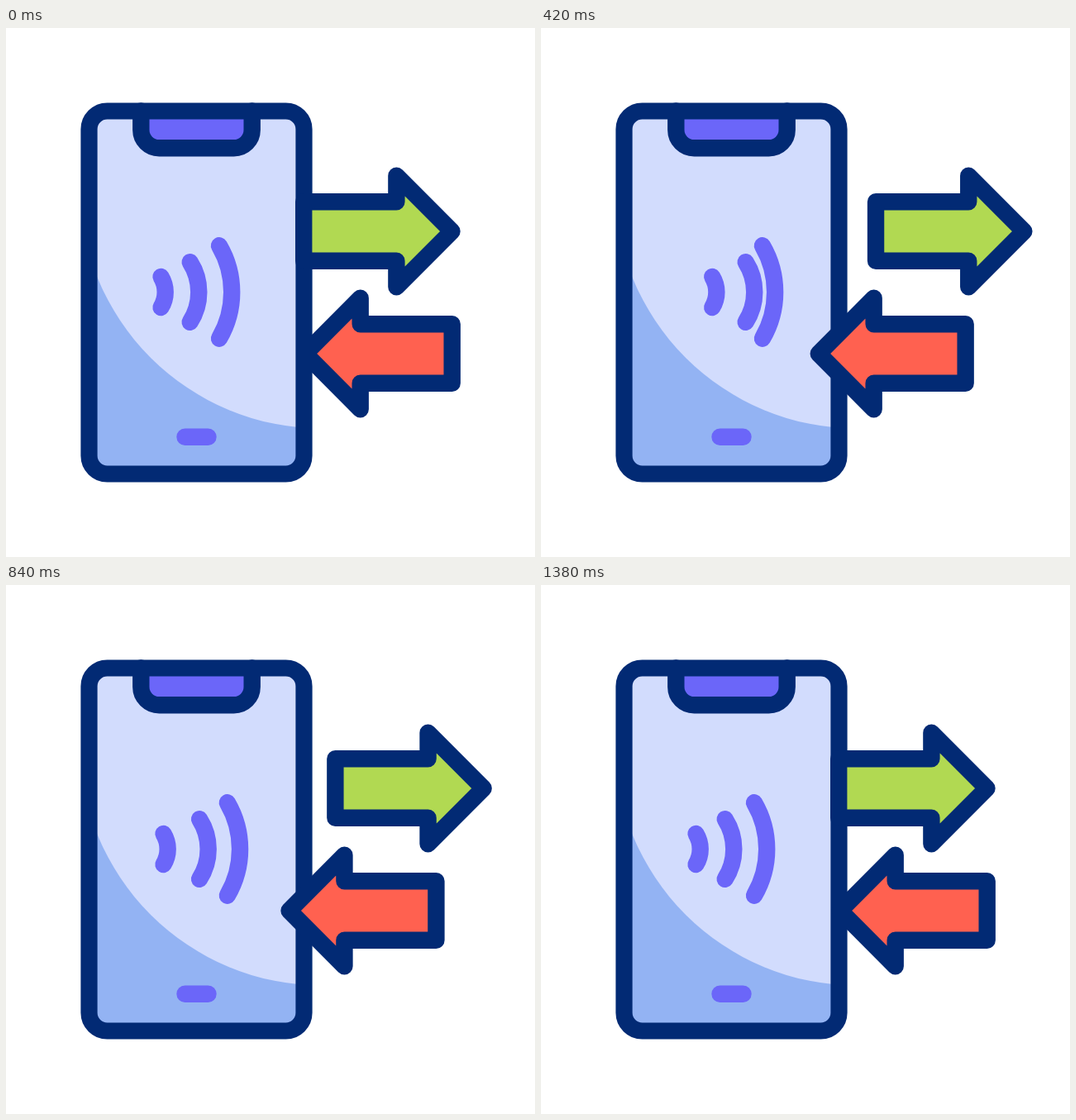
An HTML page with a canvas for the animation above (1.62 s loop, 640 by 640 pixels).

```html
<!DOCTYPE html>
<html lang="en">
<head>
<meta charset="utf-8">
<title>Phone transfer</title>
<style>
  html, body { margin: 0; width: 100%; height: 100%; overflow: hidden; background: #fff; }
  canvas { display: block; width: 100vmin; height: 100vmin; }
</style>
</head>
<body>
<canvas id="stage" width="640" height="640"></canvas>
<script>
const ctx = document.getElementById('stage').getContext('2d');
const LOOP = 1620, STEP = 20;
const NAVY = '#022a74', PURPLE = '#6b66f9', LIGHT = '#d2dcfd', BLUE = '#93b3f3';
const GREEN = '#b1d952', RED = '#ff6150';

// Keys are [time in ms, horizontal offset]
const greenKeys = [[0, 0], [200, -2.1], [400, 45], [690, 32], [1000, 45], [1195, 0]];
const redKeys = [[0, 0], [200, 14.8], [400, -26.2], [690, -13], [1000, -26.2], [1195, 0]];
const waves = [
  { x: 187.5, half: 18.5, bulge: 5.2, keys: [[0, 0], [200, 23.5], [1033, 0]] },
  { x: 222.7, half: 36.3, bulge: 10.6, keys: [[0, 0], [400, 25], [1233, 0]] },
  { x: 258, half: 56.2, bulge: 15.2, keys: [[0, 0], [600, 12.5], [1390, 0]] }
];

const ease = p => (1 - Math.cos(Math.PI * p)) / 2;

function valueAt(keys, t) {
  for (let i = 1; i < keys.length; i++) {
    const [t0, a] = keys[i - 1], [t1, b] = keys[i];
    if (t < t1) return a + (b - a) * ease((t - t0) / (t1 - t0));
  }
  return keys[keys.length - 1][1];
}

function paint(fill, stroke, width = 20.4) {
  if (fill) { ctx.fillStyle = fill; ctx.fill(); }
  if (stroke) { ctx.strokeStyle = stroke; ctx.lineWidth = width; ctx.stroke(); }
}

function drawPhone() {
  const body = new Path2D();
  body.roundRect(100.5, 100.5, 260, 439, 22);
  ctx.save();
  ctx.clip(body);
  ctx.fillStyle = BLUE;
  ctx.fillRect(90, 90, 280, 460);
  ctx.beginPath();
  ctx.arc(382, 191.5, 293, 0, 7);
  paint(LIGHT);
  ctx.restore();

  ctx.beginPath();
  ctx.moveTo(163.3, 100.5);
  ctx.arcTo(163.3, 145.3, 230, 145.3, 22);
  ctx.arcTo(297.7, 145.3, 297.7, 100.5, 22);
  ctx.lineTo(297.7, 100.5);
  paint(PURPLE, NAVY);

  ctx.strokeStyle = NAVY;
  ctx.lineWidth = 20.2;
  ctx.stroke(body);

  ctx.beginPath();
  ctx.moveTo(216.5, 494.8);
  ctx.lineTo(244.5, 494.8);
  paint(null, PURPLE);
}

function drawWave({ x, half, bulge, keys }, t) {
  const radius = (half * half + bulge * bulge) / (2 * bulge);
  const angle = Math.asin(half / radius);
  const cx = x + bulge - radius + valueAt(keys, t);
  ctx.beginPath();
  ctx.arc(cx, 319.5, radius, -angle, angle);
  paint(null, PURPLE);
}

function drawArrow(tail, neck, tip, y, color, dx) {
  const shaft = 35.7, head = 67.2;
  const points = [
    [tail, -shaft], [neck, -shaft], [neck, -head], [tip, 0],
    [neck, head], [neck, shaft], [tail, shaft]
  ];
  ctx.beginPath();
  for (const [px, py] of points) ctx.lineTo(px + dx, y + py);
  ctx.closePath();
  paint(color, NAVY);
}

function draw(now) {
  const t = Math.floor((now % LOOP) / STEP) * STEP;
  ctx.fillStyle = '#fff';
  ctx.fillRect(0, 0, 640, 640);
  ctx.lineCap = ctx.lineJoin = 'round';
  drawPhone();
  for (const wave of waves) drawWave(wave, t);
  drawArrow(360.2, 472.4, 539.5, 246, GREEN, valueAt(greenKeys, t));
  drawArrow(539.7, 428.7, 361.8, 394, RED, valueAt(redKeys, t));
}

let start = null;
function tick(now) {
  if (start === null) start = now;
  draw(now - start);
  requestAnimationFrame(tick);
}
draw(0);
requestAnimationFrame(tick);
</script>
</body>
</html>
```
